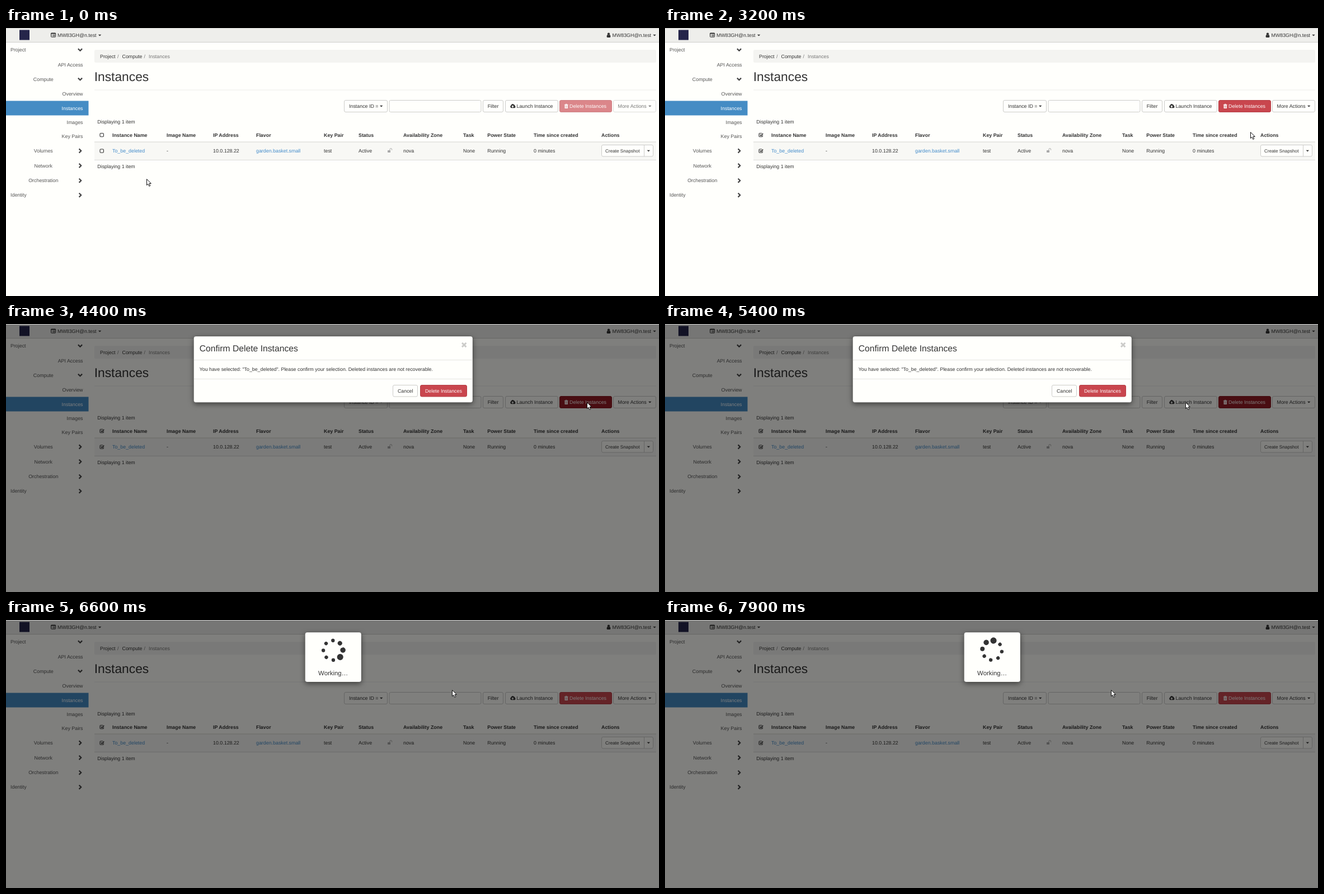
Write an HTML page that moves like this. It is 1167 px wide and 480 px high and loops after 8000 ms.

```html
<!DOCTYPE html>
<html lang="en">
<head>
<meta charset="utf-8">
<title>Delete instances</title>
<style>
  html, body { margin: 0; width: 100%; height: 100%; overflow: hidden; background: #fffffc; }
  svg { display: block; width: 100%; height: 100%; }
  text { font-family: "Liberation Sans", Arial, sans-serif; text-rendering: geometricPrecision; white-space: pre; }
  .card { filter: drop-shadow(0 3px 4.6px rgba(0, 0, 0, .5)); }
</style>
</head>
<body>
<svg id="stage" viewBox="0 0 1167 480" xmlns="http://www.w3.org/2000/svg"></svg>
<script>
const LOOP = 8000, STEP = 100;
const PAPER = '#fffffc', INK = '#333', SIDE = '#555', LINK = '#428bca', LINE = '#ccccca';
const RED = [201, 70, 78], DARK_RED = [148, 27, 36];
const USER = 'MW83GH@n.test';

// ---- drawing helpers: text is placed by its vertical middle ----
const text = (x, y, s, { fill = INK, size = 8.87, anchor = 'start', weight = 400 } = {}) =>
  `<text x="${x}" y="${y + size * 0.35}" fill="${fill}" font-size="${size}" font-weight="${weight}" text-anchor="${anchor}">${s}</text>`;
const rect = (x, y, w, h, fill, extra = '') =>
  `<rect x="${x}" y="${y}" width="${w}" height="${h}" fill="${fill}" ${extra}/>`;
const box = (x, y, w, h, extra = '') =>
  rect(x + .5, y + .5, w - 1, h - 1, PAPER, `rx="2.5" stroke="${LINE}" ${extra}`);
const path = (d, fill = INK, extra = '') => `<path d="${d}" fill="${fill}" ${extra}/>`;
const stroke = (d, color, width, extra = '') =>
  path(d, 'none', `stroke="${color}" stroke-width="${width}" ${extra}`);
const group = (id, body, extra = '') => `<g id="${id}" ${extra}>${body}</g>`;
const caret = (x, y) => path(`M${x - 2.7} ${y - 1.3}h5.4l-2.7 2.8z`);
const chevron = (x, y, turn) =>
  stroke('M-3.6 -1.9L0 1.7L3.6 -1.9', '#444', 2.2, `transform="translate(${x} ${y}) rotate(${turn})"`);

// ---- icons ----
const listIcon = rect(80.5, 9, 8.2, 7.2, 'none', `rx=".8" stroke="${INK}"`) +
  rect(80.5, 9, 8.2, 1.6, INK) +
  stroke('M82 12h1M84 12h3.6M82 13.4h1M84 13.4h3.6M82 14.8h1M84 14.8h3.6', INK, .8);
const userIcon = `<circle cx="1077" cy="10.6" r="2.2" fill="${INK}"/>` +
  path('M1073.6 15.8q-.1-3.6 1.9-3.8q1.5 1.3 3 0q2 .2 1.9 3.8q-.1 1.1-1.2 1.1h-4.4q-1.1 0-1.2-1.1z');
const cloudIcon = path('M903 143.2a2.4 2.4 0 0 1-.6-4.4a3 3 0 0 1 5.6-1.2a1.7 1.7 0 0 1 1.6 2a2 2 0 0 1-.4 3.6z') +
  path('M905.5 138.4l2.3 2.4h-1.5v1.7h-1.6v-1.7h-1.5z', PAPER);
const trashIcon = color => stroke('M997.8 137.6h7M999.9 137.4v-1h2.8v1', '#fff', .9) +
  path('M998.5 138.2h5.6v5q0 .9-.9.9h-3.8q-.9 0-.9-.9z', '#fff') +
  stroke('M1000 139.4v3.4M1001.3 139.4v3.4M1002.6 139.4v3.4', color, .55);
const lockIcon = rect(682, 219, 5, 4, '#aaa', 'rx=".5"') +
  stroke('M686 219v-1.6a1.8 1.8 0 0 1 3.6 0v1.5', '#aaa', 1);
const emptyCheck = y => rect(168, y - 3, 6.4, 6.2, 'none', `rx="1.4" stroke="${INK}" stroke-width="1.1"`);
const fullCheck = y =>
  stroke(`M173.3 ${y - 3}h-4q-1.3 0-1.3 1.3v3.6q0 1.3 1.3 1.3h3.8q1.3 0 1.3-1.3v-1.4`, INK, 1.1) +
  stroke(`M169.7 ${y - .5}l1.9 1.9l3.6-3.9`, INK, 1.6);

// ---- page parts ----
function navbar() {
  return rect(0, 0, 1167, 25, '#eeeeeb') + rect(0, 0, 1167, 1, '#d0d0ce') + rect(0, 25, 1167, 1, '#cfcfcc') +
    rect(24, 3.5, 18, 18, '#25254a') +
    listIcon + text(92, 12.8, USER) + caret(167.6, 13) +
    userIcon + text(1083.5, 12.8, USER) + caret(1159, 13);
}

function sidebar() {
  const side = (x, y, s, anchor) => text(x, y, s, { fill: SIDE, anchor });
  const leaves = [['API Access', 65.5], ['Overview', 118], ['Images', 168.7], ['Key Pairs', 194]];
  const groups = [['Compute', 91.5, 0], ['Volumes', 220, -90], ['Network', 246.5, -90], ['Orchestration', 273.3, -90]];
  return side(8, 39, 'Project') + chevron(132.5, 39, 0) +
    side(8, 299.3, 'Identity') + chevron(132.5, 299.3, -90) +
    leaves.map(([s, y]) => side(137.5, y, s, 'end')).join('') +
    groups.map(([s, y, turn]) => side(66.8, y, s, 'middle') + chevron(132.5, y, turn)).join('') +
    rect(0, 130.5, 147.5, 26, '#458cc4') + text(137.5, 143.5, 'Instances', { fill: '#fff', anchor: 'end' });
}

function heading() {
  const grey = { fill: '#777' };
  return rect(158, 39, 1004, 23, '#f4f4f1', 'rx="2.5"') +
    text(168, 50.4, 'Project') + text(199, 50.4, '/', grey) +
    text(207.5, 50.4, 'Compute') + text(246.5, 50.4, '/', grey) + text(255, 50.4, 'Instances', grey) +
    text(157.7, 87, 'Instances', { size: 22.8 }) + rect(158, 110.5, 1004, 1, '#eeeeeb');
}

function toolbar() {
  return box(604, 129, 78, 22) + text(613, 140, 'Instance ID =') + caret(670.7, 140) +
    box(684.5, 129, 165, 22) +
    box(852, 129, 37, 22) + text(860.7, 140, 'Filter') +
    box(892, 129, 95, 22) + cloudIcon + text(912.5, 140, 'Launch Instance') +
    group('bulk',
      group('pageDelete', rect(989.5, 129.5, 93, 21, 'inherit', 'rx="2.5" stroke="inherit"').replace('fill="inherit" ', '').replace('stroke="inherit"', '') +
        trashIcon('#c9464e') + text(1007, 140, 'Delete Instances', { fill: '#fff' })) +
      box(1085, 129, 77, 22) + text(1093.5, 140, 'More Actions') + caret(1150.7, 140));
}

function table() {
  const cols = [[190, 'Instance Name', 'To_be_deleted'], [287, 'Image Name', '-'], [370, 'IP Address', '10.0.128.22'],
    [447, 'Flavor', 'garden.basket.small'], [568, 'Key Pair', 'test'], [630, 'Status', 'Active'],
    [710, 'Availability Zone', 'nova'], [817, 'Task', 'None'], [860.3, 'Power State', 'Running'],
    [943, 'Time since created', '0 minutes'], [1064, 'Actions', '']];
  const links = [190, 447];
  return text(163.3, 168, 'Displaying 1 item') + text(163.3, 248, 'Displaying 1 item') +
    rect(158, 205, 1004, 31, '#f8f8f5') + rect(158, 203.5, 1004, 1.3, '#dcdcda') + rect(158, 236, 1004, 1, '#dcdcda') +
    cols.map(([x, head, cell]) => text(x, 191.5, head, { weight: 700 }) +
      text(x, 220, cell, { fill: links.includes(x) ? LINK : INK })).join('') +
    lockIcon + box(1064, 209, 93, 21.5) + rect(1140, 209.5, 1, 20.5, LINE) +
    text(1071, 220, 'Create Snapshot', { size: 8.2 }) + caret(1148.3, 220) +
    group('unchecked', emptyCheck(191.5) + emptyCheck(220)) +
    group('checked', fullCheck(191.5) + fullCheck(220));
}

function dialogs() {
  const edge = 'rx="3.8" stroke="#000" stroke-opacity=".2"';
  const confirm = rect(335.5, 22, 498.5, 118.5, PAPER, edge + ' class="card"') +
    text(345.7, 43.3, 'Confirm Delete Instances', { size: 15.7 }) +
    stroke('M815 33.7l7.4 7.4M822.4 33.7l-7.4 7.4', '#ccccca', 2.9) +
    rect(336, 64, 498, 1, '#e5e5e2') + rect(336, 98, 498, 1, '#e5e5e2') +
    text(345.7, 81.2, 'You have selected: "To_be_deleted". Please confirm your selection. Deleted instances are not recoverable.', { size: 8.84 }) +
    box(691, 109, 45, 21.5) + text(713.7, 119.6, 'Cancel', { anchor: 'middle' }) +
    group('dialogDelete', '<rect x="740.5" y="109.5" width="83" height="20.5" rx="2.5"/>' +
      text(781.9, 119.6, 'Delete Instances', { fill: '#fff', anchor: 'middle' }));
  // biggest dot first, then counter-clockwise
  const dots = [5.57, 4.77, 3.98, 3.18, 3.18, 3.18, 3.18, 3.18].map((r, i) =>
    `<circle cx="17.5" r="${r}" transform="rotate(${-45 * i})"/>`).join('');
  const working = rect(534.5, 22, 100.5, 89, PAPER, edge + ' class="card"') +
    group('spinner', dots, `fill="${INK}"`) +
    text(584.6, 94.6, 'Working…', { size: 11.4, anchor: 'middle' });
  return group('shade', rect(0, 1, 1167, 479, '#000', 'opacity=".5"')) +
    group('confirm', confirm) + group('working', working);
}

function pointers() {
  const look = 'stroke="#111" stroke-width="1" stroke-linejoin="round"';
  return group('arrow', path('M.5 .7V11.6L3 9.3L4.8 13.4L6.8 12.6L5 8.5H8.4z', '#fff', look)) +
    group('hand', path('M-1 6V1Q-1 0 0 0Q1.1 0 1.1 1V4.2Q2.5 3.4 2.9 4.7Q4.3 4.1 4.6 5.3Q6 5 6 6.4V8.2Q6 9.4 5.2 10.2V11.4H-.6V10.4Q-1.8 9.2-3.1 7.2Q-3.3 5.8-2 6.1z', '#fff', look) +
      stroke('M1.1 4v2.4M2.9 4.6v2M4.6 5.2v1.6', '#111', .6));
}

const stage = document.getElementById('stage');
stage.innerHTML = navbar() + sidebar() + heading() + toolbar() + table() + dialogs() + pointers();
const part = {};
stage.querySelectorAll('[id]').forEach(el => part[el.id] = el);

// ---- motion ----
// pointer stops: time, x, y, 1 = hand
const moves = [
  [0, 251, 270], [600, 222, 248], [700, 195, 229], [900, 178, 219], [1200, 173, 220], [1400, 172, 220],
  [2200, 186, 217], [2300, 330, 222], [2400, 503, 221, 1], [2600, 1013, 227],
  [2900, 1028, 212], [3000, 1045, 195], [3200, 1046, 186], [3300, 1046, 172], [3400, 1045, 158],
  [3500, 1044, 148, 1], [3600, 1043, 145, 1], [3700, 1042, 142, 1], [4000, 1039, 141, 1],
  [4400, 1038, 140], [5100, 1032, 142], [5300, 1000, 144], [5400, 930, 140], [5500, 850, 131],
  [5600, 797, 125, 1], [6200, 797, 125]];
// how dark each red button is over time
const pageTone = [[3400, 0], [3700, .6], [4100, .6], [4200, 1], [5700, 1], [6000, 0]];
const dialogTone = [[5500, 0], [5600, .6], [5700, .6], [6000, 1]];

function ramp(keys, t) {
  if (t <= keys[0][0]) return keys[0][1];
  for (let i = 1; i < keys.length; i++) {
    const [t0, a] = keys[i - 1], [t1, b] = keys[i];
    if (t <= t1) return a + (b - a) * (t - t0) / (t1 - t0);
  }
  return keys[keys.length - 1][1];
}

const show = (name, on) => part[name].setAttribute('display', on ? 'inline' : 'none');

function paintButton(name, tone) {
  const mix = RED.map((v, i) => v + (DARK_RED[i] - v) * tone);
  const button = part[name].querySelector('rect');
  button.setAttribute('fill', `rgb(${mix.map(Math.round)})`);
  button.setAttribute('stroke', `rgb(${mix.map(v => Math.round(v * .9))})`);
}

function draw(time) {
  const t = Math.floor(time % LOOP / STEP) * STEP;
  const picked = t >= 1800;
  show('unchecked', !picked);
  show('checked', picked);
  part.bulk.setAttribute('opacity', picked ? 1 : .65);
  paintButton('pageDelete', ramp(pageTone, t));
  paintButton('dialogDelete', ramp(dialogTone, t));

  show('shade', t >= 4400);
  show('confirm', t >= 4400 && t < 6200);
  show('working', t >= 6200);
  part.spinner.setAttribute('transform', `translate(584.6 54.2) rotate(${44 + (t - 6600) * .18})`);

  const [, x, y, hand] = moves.filter(m => m[0] <= t).pop();
  show('arrow', !hand);
  show('hand', hand);
  part[hand ? 'hand' : 'arrow'].setAttribute('transform', `translate(${x} ${y})`);
}

function tick() {
  draw(performance.now());
  requestAnimationFrame(tick);
}
tick();
</script>
</body>
</html>
```
